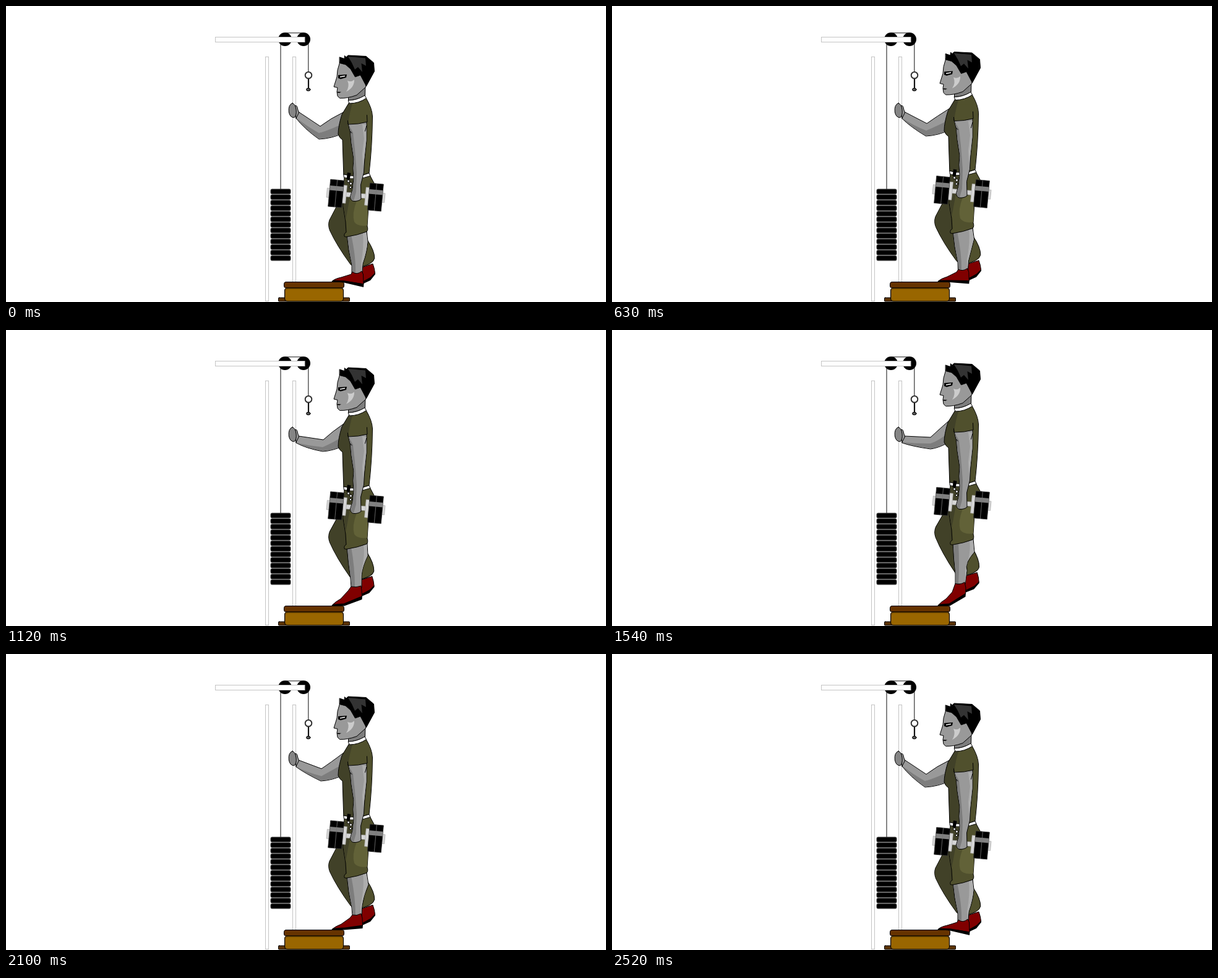
These frames come from a looping animation (970x480 px, 2.94 s). An HTML page:

```html
<!DOCTYPE html>
<html lang="en">
<head>
<meta charset="utf-8">
<title>Calf raise</title>
<style>
  html, body { margin: 0; width: 100%; height: 100%; overflow: hidden; background: #fff; }
  svg { display: block; width: 100%; height: 100%; }
  .ink { stroke: #000; stroke-width: 1; stroke-linejoin: round; stroke-linecap: round; }
  .rail { fill: #fff; stroke: #c4c4c4; }
  .cable { fill: none; stroke: #444; stroke-width: 1.3; }
  .skin { fill: #999; }
  .skin-dark { fill: #7d7d7d; }
  .skin-light { fill: #adadad; }
  .cloth { fill: #50502d; }
  .cloth-dark { fill: #414128; }
  .cloth-light { fill: #626238; }
  .shoe { fill: #800000; }
  .metal { fill: #d6d6d6; stroke: #aaa; stroke-width: .7; }
  .line { fill: none; }
</style>
</head>
<body>
<svg viewBox="0 0 970 480">
  <defs>
    <g id="plates">
      <rect x="-11" y="-22" width="22" height="44" stroke="#333" stroke-width=".8"/>
      <rect x="-11" y="-12" width="22" height="7.5" fill="#808080"/>
      <path d="M0-22V22" stroke="#777" stroke-width=".8"/>
    </g>
  </defs>

  <!-- machine -->
  <rect class="rail" x="419.5" y="82.5" width="5" height="396"/>
  <rect class="rail" x="463.5" y="82.5" width="5" height="370"/>
  <path class="cable" d="M444 54V298M451 43.6H481M488.8 54V107"/>
  <circle cx="451" cy="54" r="11"/>
  <circle cx="481" cy="54" r="11"/>
  <rect class="rail" x="338.5" y="50.5" width="144.500" height="8"/>
  <circle cx="489" cy="112.300" r="5.300" fill="#fff" stroke="#333" stroke-width="2"/>
  <path d="M489 118V134" stroke="#111" stroke-width="2.200"/>
  <ellipse class="ink" cx="488.800" cy="135.500" rx="3.300" ry="2.300" fill="#555"/>
  <g id="stack" stroke="#3a3a3a"></g>

  <!-- step -->
  <g class="ink">
    <rect x="440.5" y="473" width="115" height="6" rx="1" fill="#5c3300"/>
    <rect x="450.5" y="457" width="95" height="22" rx="4" fill="#7d5200"/>
    <rect x="449.5" y="447.500" width="97" height="9.500" rx="3" fill="#663300"/>
  </g>
  <rect x="452" y="459.500" width="92.500" height="18" rx="4" fill="#996600"/>

  <!-- supporting arm -->
  <path id="reach" class="skin ink"/>
  <path id="reachShade" class="skin-dark"/>
  <path class="skin ink" d="M468 161.500Q471 161 471.500 167L473.500 173L469 182Z"/>
  <path class="ink" fill="#858585" d="M463 157.500Q468 159 469 168Q470 178 466 181Q459 181 457.300 172Q456 160 463 157.500Z"/>

  <!-- trailing leg -->
  <g id="backLeg">
    <path class="shoe ink" d="M575 424L593 418Q596 426 596.500 433L590 440L577 448L570 448Z"/>
    <path d="M597 432.500V435L589 445L576 451V447L589 440Z"/>
    <path class="cloth ink" d="M548 295L535 324L523 347Q520 355 523.500 364Q535 389 557 419L565 425Q594 420 595.800 409Q596 397 584 379L580 340Z"/>
    <path class="cloth-dark" d="M548 297L536 325L524 347Q521 355 524 363.500Q536 389 557 418L560 415L552 374L550 330Z"/>
  </g>

  <!-- standing leg -->
  <path id="calf" class="skin ink"/>
  <path id="calfShade" class="skin-dark"/>
  <path id="calfLight" class="skin-light"/>
  <path id="shoe" class="shoe ink"/>
  <path id="sole"/>

  <g id="body">
    <path class="cloth ink" d="M547 277Q545 300 545 325L549 350L550 367Q546 369 547 373.500Q549 375 552 374Q567 372 583 366Q586 363 584 357L586 325L595 287L588 274Z"/>
    <path class="cloth-light" d="M567 316Q559 336 563 350Q568 358 584 356L585.500 325L586 310Z"/>
    <path class="cloth-dark" d="M547.500 280L563 282L556 310L549 348L545.500 325Z"/>
    <path class="cloth-dark ink" d="M555 156L543 176Q537 195 537 208Q539 214 544 217L545.800 273Q567 281 587 271Q592 228 592.500 179Q592 166 582 149Q568 158 555 156Z"/>
    <path class="cloth" d="M560 158Q573 157 582 150.500Q591.500 166 592 179Q591.500 228 586.500 270L577 273L581 190L553 191Q556 171 560 158Z"/>
    <path class="ink" fill="#fff" d="M546 273Q568 279 587 271L589 275.500Q568 283 547 278.500Z"/>
    <path d="M552 270L557.500 271L555.500 282L550.500 281Z"/>
    <g class="ink" fill="#fff">
      <circle cx="553.700" cy="284" r="2"/><circle cx="557.500" cy="288" r="2"/><circle cx="557" cy="294" r="1.800"/>
    </g>

    <!-- head -->
    <path class="skin-dark ink" d="M553.500 143V153Q567 153 580.500 145L581 128Z"/>
    <path class="skin ink" d="M540 90L536 104L535 115L530 131L536 132.500L535 139L536 146L539.500 149.500Q552 150 567 144.500L582 131L578 100Z"/>
    <path class="ink" fill="#fff" d="M553.500 153Q567 153 580 145L582.500 149.500Q570 158 555.500 158Z"/>
    <path class="ink" d="M539.500 83L547 85.500L547.500 80.500L550 83L553 80L582 81.500L594.500 92L595.500 106L582.500 130L573 112L564.500 115L557 102L549 95L539.500 92.500Z"/>
    <path fill="#333" d="M553 82L581 84.500L582 97L574.500 93L576 107L569 99L564 103L559 92Z"/>
    <path d="M537 112L551 111L550 116L541 118.500L537 117Z"/>
    <path d="M540 115L548 113.500" stroke="#fff" stroke-width="1.400"/>
    <path d="M535.500 139L542 139.500L539 141L535.500 140.500Z"/>
    <path fill="#ccc" d="M552 121Q558 124 563 119.500Q563.500 132 550 139Q556 130 552 121Z"/>

    <!-- dumbbell -->
    <g transform="translate(565.500 307) rotate(5.300)">
      <rect class="metal" x="-47" y="-7.500" width="5" height="15"/>
      <rect class="metal" x="42" y="-7.500" width="5" height="15"/>
      <rect class="metal" x="-22" y="-3.500" width="44" height="7"/>
      <rect class="metal" x="-21" y="-14.500" width="5.500" height="29"/>
      <rect class="metal" x="15.500" y="-14.500" width="5.500" height="29"/>
      <use href="#plates" x="-32"/>
      <use href="#plates" x="32"/>
    </g>

    <!-- hanging arm -->
    <path class="skin ink" d="M553 190L556.500 205L558 222L562 248L561 263L562 280L560 298L556.500 309Q557 316 562 316.500Q570 317 574 313L573.500 290L578.500 270L580 246L583 218V187Z"/>
    <path class="skin-dark" d="M554 192L557 205L558.500 222L562.500 248L561.500 263L562.500 280L560.500 298L557 309Q558 315 562 316L566 302L567 270L564 232L561 205Z"/>
    <path class="skin-light" d="M576 192H582.500V218L579.500 246L577 260L576 240L579 215Z"/>
    <path class="ink line" d="M556.500 203L559 206M583 194L580.500 203"/>
    <path class="cloth" d="M560 165L553 191.500Q570 192 584 188V165Z"/>
    <path class="ink line" d="M552.500 186L553 192Q570 192 584 188L583.500 177"/>
  </g>
</svg>

<script>
const LOOP = 2940, TICK = 70, START = 6, PEAK = 15;
const el = id => document.getElementById(id);

// Poses along the lift, at these ticks after it begins.
const knots = [0, 6, 10, 14];
const rise = ["0", "11", "19", "26"];
const shapes = {
  reach: [
    "M472 171L508 195Q525 182 546 172L546 206Q527 215 506 216Q482 199 469 182Z",
    "M473 172L510 186Q525 176 546 160L546 196Q528 205 509 206Q484 194 469 183Z",
    "M473 172L513 178Q527 165 546 152L546 188Q528 196 512 197Q485 192 469 183Z",
    "M473 172L515 174Q530 160 546 146L546 181Q530 191 515 193Q486 189 469 183Z"],
  reachShade: [
    "M470 182Q488 196 506 206Q524 201 546 190L545 206Q527 214.500 506 215.500Q483 199 470 182Z",
    "M470 183Q489 193 510 198Q528 188 546 178L545 196Q528 204.500 509 205.500Q485 194 470 183Z",
    "M470 183Q490 188 512 190Q528 183 546 172L545 188Q528 195.500 512 196.500Q486 191.500 470 183Z",
    "M470 182Q490 184 515 184Q528 180 546 165L545 181Q530 190.500 515 192.500Q487 188.500 470 182Z"],
  calf: [
    "M551 370Q553 396 559 420L559 434L576 434L577 418Q584 398 585 382L583 364Z",
    "M551 359Q553 386 559 412L560 425L575 425L576 408Q578 392 586 374L583 354Z",
    "M551 351Q553 378 557 404L558 418L575 418L575 398Q576 384 585 366L584 345Z",
    "M551 344Q552 370 555 396L555 412L571 412L574 390Q570 378 586 360L584 338Z"],
  calfShade: [
    "M552 371Q554 396 559.500 420L560 433L565 433Q566 408 558 371Z",
    "M552 360Q554 386 559.500 412L560.500 424L565 424Q565 395 558 360Z",
    "M552 352Q554 378 557.500 404L558.500 417L564 417Q564 385 558 352Z",
    "M552 345Q553 370 555.500 396L555.500 411L560 411Q562 382 560 345Z"],
  calfLight: [
    "M577 368Q579 390 574 418L575 432L576.500 418Q583.500 398 584.500 382L582.500 366Z",
    "M577 357Q580 376 573 408L574 423L575.500 408Q578 392 585.500 374L582.500 356Z",
    "M578 349Q581 366 573 398L574 416L574.500 398Q576 384 584.500 366L583.500 347Z",
    "M578 342Q581 360 571 390L571 410L573.500 390Q570 378 585.500 360L583.500 340Z"],
  shoe: [
    "M527.500 446Q532 442 542 440L558 435L560 431Q567 437 575 430L577.500 435L578 451L546 446Z",
    "M527.500 446Q532 442 542 438L556 428L560 423Q567 425 574 421L576 428L576.500 441L546 445Z",
    "M527.500 446Q532 441 541 436L553 423L558 416Q566 418 574 415L575 422L575.500 433L546 445Z",
    "M527.500 446Q532 441 540 436L550 425L555 411Q562 414 570 409L572 418L571.500 428L546 445Z"],
  sole: [
    "M526 447L530 444.500L548 445.500L578.500 450.500L578 456L546 448.500Z",
    "M526 447L530 444.500L548 443.500L577 439.500L576.500 445L546 447.500Z",
    "M526 447L530 444.500L546 443.500L576 431L575.500 437L547 447.500Z",
    "M526 447L530 444.500L545 443.500L572 426.500L571.500 432.500L546 447.500Z"]
};

function blend(poses, k) {
  const i = k < 6 ? 0 : k < 10 ? 1 : 2;
  const f = (k - knots[i]) / (knots[i + 1] - knots[i]);
  const next = poses[i + 1].match(/[\d.]+/g);
  let n = 0;
  return poses[i].replace(/[\d.]+/g, v => (+v + (next[n++] - v) * f).toFixed(2));
}

function draw(ms) {
  const tick = Math.floor((ms % LOOP) / TICK);
  const lift = Math.max(0, PEAK - Math.abs(tick - START - PEAK));
  const k = Math.min(lift, 14.2);
  const y = -blend(rise, k);
  for (const id in shapes) el(id).setAttribute("d", blend(shapes[id], k));
  el("body").setAttribute("transform", `translate(0 ${y})`);
  el("backLeg").setAttribute("transform",
    `translate(0 ${y}) rotate(${Math.max(0, k - 7) * 0.35} 560 356)`);
}

for (let i = 0; i < 13; i++) {
  el("stack").insertAdjacentHTML("beforeend",
    `<rect x="428" y="${297 + 9 * i}" width="32" height="7.800" rx="2"/>`);
}

const begin = performance.now();
function loop() {
  draw(performance.now() - begin);
  requestAnimationFrame(loop);
}
draw(0);
requestAnimationFrame(loop);
</script>
</body>
</html>
```
